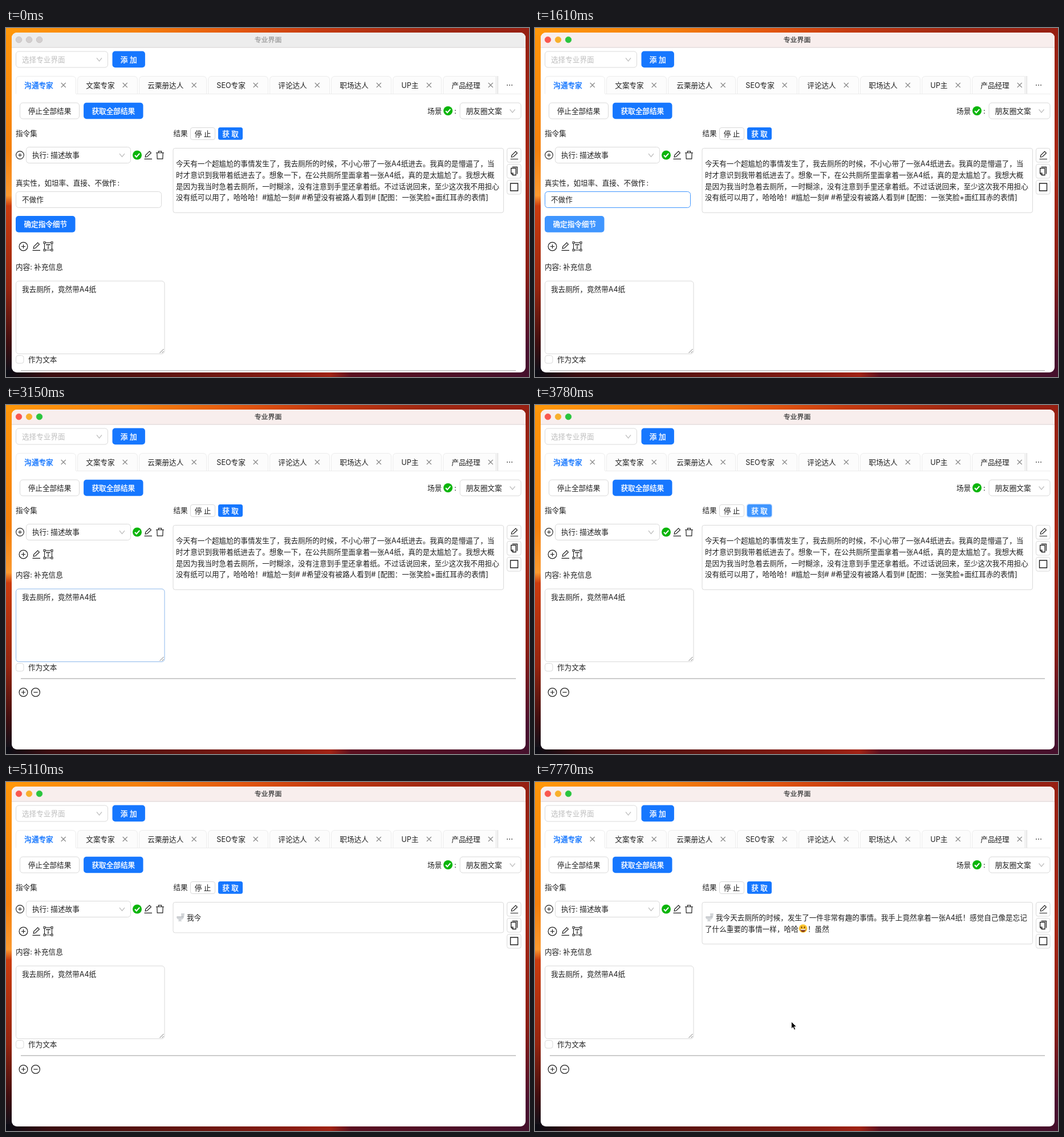
Write an HTML page that moves like this. It is 917 by 611 pixels and loops after 8 s.

```html
<!DOCTYPE html>
<html lang="zh-CN">
<head>
<meta charset="utf-8">
<style>
html, body { margin: 0; width: 100%; height: 100%; overflow: hidden; }
body {
  background:
    linear-gradient(90deg, #ff980a, #f5800c 25%, #e2560f 45%, #c43a10 60%, #a02812 80%, #961f12) 0 0 / 100% 12px no-repeat,
    linear-gradient(90deg, #0a0c14, #3a0c10 8%, #5e1410 30%, #8a1c12 55%, #a02214 62%, #5a1020 66%, #45102c) 0 100% / 100% 12px no-repeat,
    linear-gradient(#ff960a, #f5800c 35%, #fb9a30 48%, #cc3c0f 51%, #94240f 75%, #400e10 90%, #08101a) 0 0 / 50% 100% no-repeat,
    linear-gradient(#961f12, #a82614 40%, #8a1c14 70%, #4a0f30 92%, #45102c) 100% 0 / 50% 100% no-repeat;
}
svg { display: block; width: 917px; height: 611px; }
text { font: 12.6px Inter, "Noto Sans CJK SC", "Noto Sans CJK", sans-serif; }
#title { font-size: 11.9px; }
</style>
</head>
<body>
<svg id="stage" viewBox="0 0 917 611"></svg>
<script>
const INK = '#1f1f1f', BLUE = '#1677ff', LINE = '#d9d9d9';

// Text is placed by the vertical centre of its line.
const text = (x, cy, s, { fill = INK, anchor = 'start', bold = 0, id = '' } = {}) =>
  `<text id="${id}" x="${x}" y="${cy + 4.7}" fill="${fill}" text-anchor="${anchor}"` +
  `${bold ? ` stroke="${fill}" stroke-width="${bold}"` : ''}>${s}</text>`;
const box = (x, y, w, h, { fill = '#fff', stroke = LINE, r = 5, id = '' } = {}) =>
  `<rect id="${id}" x="${x}" y="${y}" width="${w}" height="${h}" rx="${r}" fill="${fill}" stroke="${stroke}"/>`;
const path = (d, stroke = INK, width = 1.2) =>
  `<path d="${d}" fill="none" stroke="${stroke}" stroke-width="${width}"/>`;
const at = (x, y, s) => `<g transform="translate(${x} ${y})">${s}</g>`;
const group = (id, s) => `<g id="${id}">${s}</g>`;

const button = (x, y, w, h, s, primary, id, r = 5) =>
  box(x, y, w, h, { r, id, fill: primary ? BLUE : '#fff', stroke: primary ? 'none' : LINE }) +
  text(x + w / 2, y + h / 2 + .2, s, { anchor: 'middle', fill: primary ? '#fff' : INK, bold: primary ? .4 : 0 });
const select = (x, y, w, s, fill = INK) =>
  box(x, y, w, 28, {}) + text(x + 10.5, y + 14, s, { fill }) +
  at(x + w - 15, y + 14, path('M-4.5-2.5L0 3L4.5-2.5', '#bfbfbf'));

const ring = '<circle r="7.4" fill="none" stroke="#1f1f1f" stroke-width="1.2"/>';
const plus = ring + path('M-3.6 0H3.6M0-3.6V3.6');
const minus = ring + path('M-3.6 0H3.6');
const pen = path('M-6.5 7H7M-4.8 3.6L-4.2 .2L2.6-6.4L5.4-3.6L-1.4 3Z');
const trash = path('M-7-4H7M-2.8-4V-6.6H2.8V-4M-5.2-4L-4.8 6.6H4.8L5.2-4');
const copy = path('M3-5V7H-2.4L-5.4 4V-5ZM-3.4-7.2H5.4V5', INK, 1.3) + path('M-5.4 3.6H-2V7');
const square = path('M-6.5-6.5H6.5V6.5H-6.5Z', INK, 1.4);
const corners = [[-6.5, -6.5], [6.5, -6.5], [-6.5, 6.5], [6.5, 6.5]];
const textBox = path('M-6.5-6.5H6.5V6.5H-6.5ZM-3.2-1.8V-3.2H3.2V-1.8M0-3.2V3.4M-1.6 3.4H1.6', INK, 1.1) +
  corners.map(([x, y]) => `<rect x="${x - 1.5}" y="${y - 1.5}" width="3" height="3" fill="#fff" stroke="${INK}"/>`).join('');
const check = '<circle r="8" fill="#0ab50a"/>' + path('M-4 .3L-1.2 3.2L4.2-2.8', '#fff', 2);
const toilet = '<path d="M1-7H7L6 0H1.5ZM-7-1H6Q5 4 1 4L2 7H-4L-3 4Q-7 3-7-1Z" fill="#d3d6d9"/>' +
  path('M-6.5-1H5', '#a9adb2', 1);
const grin = '<circle r="7.3" fill="#fdc62f"/><ellipse cx="-2.5" cy="-2" rx="1" ry="1.7" fill="#6b3a10"/>' +
  '<ellipse cx="2.5" cy="-2" rx="1" ry="1.7" fill="#6b3a10"/><path d="M-5 1H5Q4 6 0 6T-5 1Z" fill="#7a2d12"/>' +
  '<path d="M-4.6 1H4.6L4 2.8H-4Z" fill="#fff"/>';

const tabs = [
  [17, 106, '沟通专家'], [125, 106, '文案专家'], [233, 119, '云栗册达人'], [354, 106, 'SEO专家'],
  [462, 106, '评论达人'], [570, 106, '职场达人'], [678, 86, 'UP主'], [766, 106, '产品经理']
];
const tab = ([x, w, s], i) =>
  `<path d="M${x + .5} 115.5V91Q${x + .5} 84.5 ${x + 7} 84.5H${x + w - 7}Q${x + w - .5} 84.5 ${x + w - .5} 91V115.5" ` +
  `fill="${i ? '#fcfcfc' : '#fff'}" stroke="#ececec"/>` +
  text(x + 15.3, 100, s, i ? {} : { fill: BLUE, bold: .45 }) +
  at(x + w - 22.3, 100, path('M-4-4L4 4M4-4L-4 4', '#858585', 1.1));

const oldReply = [
  '今天有一个超尴尬的事情发生了，我去厕所的时候，不小心带了一张A4纸进去。我真的是懵逼了，当',
  '时才意识到我带着纸进去了。想象一下，在公共厕所里面拿着一张A4纸，真的是太尴尬了。我想大概',
  '是因为我当时急着去厕所，一时糊涂，没有注意到手里还拿着纸。不过话说回来，至少这次我不用担心',
  '没有纸可以用了，哈哈哈！#尴尬一刻# #希望没有被路人看到# [配图：一张笑脸+面红耳赤的表情]'
];
const newReply = [
  '我今天去厕所的时候，发生了一件非常有趣的事情。我手上竟然拿着一张A4纸！感觉自己像是忘记',
  '了什么重要的事情一样，哈哈', '！虽然'
];

const header =
  box(10, 8, 901, 27, { id: 'titlebar', stroke: 'none', r: 0 }) + path('M10 34H911', '#dcd8d8', 1) +
  [22.5, 40.5, 58.5].map(x => `<circle class="light" cx="${x}" cy="20.5" r="5.3" stroke-width=".7"/>`).join('') +
  text(459.5, 20.5, '专业界面', { anchor: 'middle', id: 'title', bold: .35 }) +
  select(17.5, 41, 161, '选择专业界面', '#bfbfbf') + button(186.5, 40.6, 57.4, 28.6, '添 加', true) +
  `<g clip-path="url(#tabClip)">${tabs.map(tab).join('')}</g>` +
  path('M123 115.5H904', '#ececec', 1) +
  '<rect x="858" y="84" width="4" height="31" fill="#f1f1f1"/>' + path('M862.5 84V115', '#dedede', 1) +
  [879, 883, 887].map(x => `<circle cx="${x}" cy="100" r=".9" fill="#444"/>`).join('') +
  button(24.5, 131, 104, 28, '停止全部结果') + button(136.1, 130.7, 104.4, 28.6, '获取全部结果', true) +
  text(739, 145, '场景') + at(775, 145, check) + text(786, 145, ':') + select(796, 131, 107, '朋友圈文案');

const results =
  text(293.5, 184.5, '结果') + button(323.5, 174.5, 43, 21, '停 止', false, '', 3.5) +
  '<rect id="wave" fill="none" stroke="#1677ff"/>' +
  button(372, 174.1, 43, 21.6, '获 取', true, 'fetch', 3.5) +
  box(293, 210.5, 579.5, 113, { id: 'reply', r: 3.5 }) +
  group('before', oldReply.map((s, i) => text(298, 237.2 + 19.8 * i, s)).join('')) +
  group('after', at(306, 237, toilet) + newReply.map((_, i) =>
    text([317, 298, 478][i], i ? 257 : 237.2, '', { id: 'part' + i })).join('') +
    group('grin', at(470, 256.5, grin))) +
  [pen, copy, square].map((icon, i) =>
    box(878.5, 210.5 + 28 * i, 24.5, 24.5, { r: 3.5 }) + at(891, 222.5 + 28 * i, icon)).join('');

const commands =
  text(17, 184, '指令集') + at(24.5, 222.5, `<g transform="scale(.93)">${plus}</g>`) +
  select(35.5, 208.5, 183, '执行: 描述故事') +
  at(230, 222.5, check) + at(249, 222.3, pen) + at(270, 222.5, trash);

const form = group('form',
  text(17, 271.5, '真实性，如坦率、直接、不做作') + text(195.5, 271.5, ':') +
  box(17.5, 286.5, 255, 28, { id: 'input' }) + text(28, 300.3, '不做作') +
  group('caret', path('M66.5 293V308', '#000', 1)) +
  button(17, 329.1, 104.5, 28.6, '确定指令细节', true, 'confirm'));

const content = group('content',
  at(30.5, 382.5, plus) + at(53, 382.3, pen) + at(74, 382.3, textBox) +
  text(17, 418.3, '内容: 补充信息') + box(17.5, 443, 260.5, 127.5, { id: 'area' }) +
  text(28, 457.3, '我去厕所，竟然带A4纸') + path('M269.5 569L276.5 562M273.5 569L276.5 566', '#777', 1) +
  box(17.5, 573.5, 13.5, 13.5, { r: 3.5 }) + text(39, 580.3, '作为文本') +
  path('M26 600H894', '#999', 1) + at(30.5, 624, plus) + at(52, 624, minus));

const pointer = group('pointer', at(449.5, 419.5,
  '<path d="M0 0V12.5L2.9 9.8L5 14.4L7.2 13.4L5.2 9H9Z" fill="#000" stroke="#fff" stroke-width=".9"/>'));

const $ = id => document.getElementById(id);
$('stage').innerHTML =
  '<defs><clipPath id="win"><rect x="10" y="8" width="901" height="595" rx="9"/></clipPath>' +
  '<clipPath id="tabClip"><rect x="10" y="80" width="852" height="40"/></clipPath></defs>' +
  '<g clip-path="url(#win)"><rect width="917" height="611" fill="#fff"/>' +
  header + commands + form + content + results + pointer + '</g>';

const set = (id, attrs) => { for (const k in attrs) $(id).setAttribute(k, attrs[k]); };
const show = (id, on) => set(id, { display: on ? 'inline' : 'none' });
const ramp = (t, from, to) => Math.min(1, Math.max(0, (t - from) / (to - from)));
const easeOut = k => 1 - (1 - k) ** 3;
const mix = (a, b, k) => `rgb(${a.map((v, i) => Math.round(v + (b[i] - v) * k))})`;
const GREY = [217, 217, 217], DEEP = [22, 119, 255], LIGHT = [64, 150, 255];

// Bursts of streamed text: start time, first length, characters per tick, ticks.
const bursts = [[5110, 2, 2, 3], [5390, 8, 2, 5], [5880, 18, 2, 9], [6650, 36, 0, 1], [6860, 41, 0, 1], [7070, 43, 1.8, 11]];
function typedLength(t) {
  const burst = bursts.filter(b => t >= b[0]).pop();
  if (!burst) return 0;
  const [start, first, step, ticks] = burst;
  return Math.round(first + step * Math.min(ticks - 1, Math.floor((t - start) / 70)));
}

function draw(t) {
  const active = t >= 980;
  set('titlebar', { fill: active ? '#f8eeed' : '#ededed' });
  set('title', { fill: active ? '#444' : '#a0a0a0', stroke: active ? '#444' : '#a0a0a0' });
  document.querySelectorAll('.light').forEach((light, i) => {
    const color = ['#f9584f', '#f8b02c', '#2ac53e'][i];
    light.setAttribute('fill', active ? color : '#d3cfcf');
    light.setAttribute('stroke', active ? color : '#bdb8b8');
  });

  const collapsed = t >= 1960;
  show('form', !collapsed);
  set('input', { stroke: mix(GREY, LIGHT, easeOut(ramp(t, 940, 1260))) });
  show('caret', t >= 980 && t < 1480);
  set('confirm', { fill: mix(DEEP, LIGHT, ramp(t, 1420, 1610)) });
  set('content', { transform: `translate(0 ${collapsed ? -121 : 0})` });
  set('area', { stroke: mix(GREY, LIGHT, ramp(t, 1960, 2200) - ramp(t, 3010, 3290)) });

  set('fetch', { fill: mix(DEEP, LIGHT, ramp(t, 3450, 3640) - ramp(t, 4200, 4410)) });
  const spread = 5 * easeOut(ramp(t, 3740, 4140));
  set('wave', {
    x: 372 - spread / 2, y: 174 - spread / 2, width: 43 + spread, height: 22 + spread, rx: 3.5 + spread / 2,
    'stroke-width': spread, opacity: t < 3780 ? 0 : .22 * (1 - ramp(t, 3780, 4480))
  });

  const n = typedLength(t), [first, second, last] = newReply;
  const rest = Math.max(0, n - first.length), tail = rest - second.length;
  show('before', !n);
  show('after', n);
  $('part0').textContent = first.slice(0, n);
  $('part1').textContent = second.slice(0, rest);
  $('part2').textContent = last.slice(0, Math.max(0, tail - 1));
  show('grin', tail >= 1);
  set('reply', { height: 33.6 + 19.8 * (n ? (rest ? 2 : 1) : 4) });
  show('pointer', t >= 5390);
}

function frame() {
  draw(performance.now() % 8000);
  requestAnimationFrame(frame);
}
frame();
</script>
</body>
</html>
```
